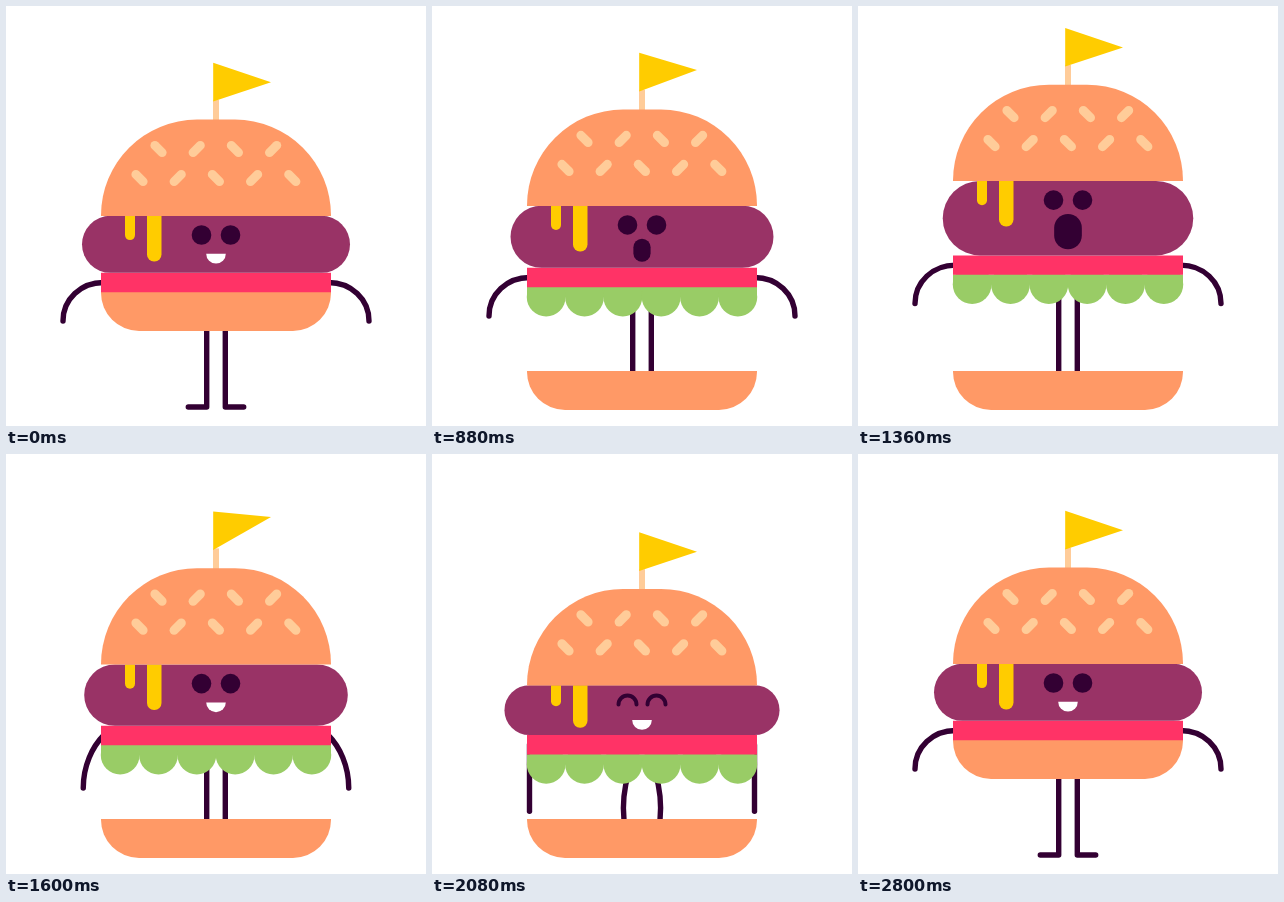
Animation of 420 by 420 pixels, one loop 2880 ms. Source, as an HTML page with a canvas:

```html
<!DOCTYPE html>
<html lang="en">
<head>
<meta charset="utf-8">
<title>Burger</title>
<style>
html, body { margin: 0; width: 100%; height: 100%; overflow: hidden; background: #fff; }
canvas { display: block; }
</style>
</head>
<body>
<canvas id="stage" width="420" height="420"></canvas>
<script>
const ctx = document.getElementById('stage').getContext('2d');
const LOOP = 2880, STEP = 80;
const BUN = '#ff9966', SEED = '#ffcc99', MEAT = '#993366', TOMATO = '#ff3366',
      LEAF = '#99cc66', MUSTARD = '#ffcc00', INK = '#330033';

const clamp = p => Math.max(0, Math.min(1, p));
const ramp = (t, from, to) => clamp((t - from) / (to - from));
const easeOut = (p, power) => 1 - (1 - p) ** power;
const smooth = p => p * p * (3 - 2 * p);
const wave = p => Math.sin(Math.PI * p);
const lerp = (a, b, p) => a + (b - a) * p;

// Offsets of the layers from the resting pose
function poseAt(t) {
  const fall = smooth(ramp(t, 1440, 1760));
  const rise = easeOut(ramp(t, 720, 1440), 1.25) * (1 - fall);
  const kick = ramp(t, 2320, 2400) * (1 - ramp(t, 2400, 2560));
  const drop = ramp(t, 240, 560) ** 2 - ramp(t, 2160, 2400) ** 2.5;
  return {
    top: -37.3 * rise + 38.5 * fall * (1 - ramp(t, 1840, 2380)) - 8 * kick,
    mid: -18.6 * rise + 28.6 * fall * (1 - ramp(t, 1840, 2320)) - 4 * kick,
    base: 79 * drop - 4 * kick,
    arm: 1 - fall + easeOut(ramp(t, 2320, 2800), 2),
    knee: 31 * ramp(t, 1600, 1760) * (1 - ramp(t, 1840, 2440)),
    tip: -3 * wave(ramp(t, 720, 1360)) - 14 * wave(ramp(t, 1440, 1800))
  };
}

function box(color, x, y, w, h, radii = 0) {
  ctx.fillStyle = color;
  ctx.beginPath();
  ctx.roundRect(x, y, w, h, radii);
  ctx.fill();
}

function disc(color, x, y, r, end = 2 * Math.PI) {
  ctx.fillStyle = color;
  ctx.beginPath();
  ctx.arc(x, y, r, 0, end);
  ctx.fill();
}

function stroke(color, width, path) {
  ctx.strokeStyle = color;
  ctx.lineWidth = width;
  ctx.beginPath();
  path();
  ctx.stroke();
}

// Draws once as is and once reflected about the vertical middle
function mirrored(draw) {
  draw();
  ctx.save();
  ctx.translate(420, 0);
  ctx.scale(-1, 1);
  draw();
  ctx.restore();
}

function limbs({ mid, arm, knee }) {
  const x = bent => lerp(97.5, bent, arm);
  const y = (straight, bent) => lerp(straight, bent, arm) + mid;
  mirrored(() => {
    stroke(INK, 5.4, () => {
      const hip = 293 + mid;
      ctx.moveTo(200.7, hip);
      ctx.quadraticCurveTo(200.7 - knee, (hip + 401) / 2, 200.7, 401);
      ctx.lineTo(182.3, 401);
    });
    stroke(INK, 5.4, () => {
      ctx.moveTo(97.5, 276.5 + mid);
      ctx.bezierCurveTo(x(75), y(299, 276.5), x(57), y(321, 293), x(57), y(343, 315));
    });
  });
}

function lettuce(mid, gap) {
  const open = clamp(gap / 30);
  if (!open) return;
  ctx.save();
  ctx.translate(95, 286 + mid);
  ctx.scale(1, open);
  box(LEAF, 0, 0, 230, 10);
  for (let i = 0; i < 6; i++) disc(LEAF, (i + 0.5) * 230 / 6, 10, 19.4);
  ctx.restore();
}

function face(t, y, lift) {
  const gasping = t >= 800 && t < 1600;
  const laughing = t >= 1680 && t < 2160;
  for (const x of [195.5, 224.5]) {
    if (laughing) stroke(INK, 4, () => ctx.arc(x, y + 22.5, 9, Math.PI, 0));
    else disc(INK, x, y + 19.2, 9.8);
  }
  if (gasping) {
    const w = 13 + 0.42 * lift, h = 18 + 0.5 * lift;
    box(INK, 210 - w / 2, y + 33, w, h, w / 2);
  } else disc('#fff', 210, y + 38, 9.8, Math.PI);
}

function seedRow(count, x, y) {
  for (let i = 0; i < count; i++) {
    const sx = x + 38.2 * i, slant = i % 2 ? -3.6 : 3.6;
    stroke(SEED, 9, () => {
      ctx.moveTo(sx - 3.6, y - slant);
      ctx.lineTo(sx + 3.6, y + slant);
    });
  }
}

function topBun(y, tip) {
  box(SEED, 207, y - 116, 6, 22);
  ctx.fillStyle = MUSTARD;
  ctx.beginPath();
  ctx.moveTo(207.2, y - 153);
  ctx.lineTo(265, y - 133.5 + tip);
  ctx.lineTo(207.2, y - 114.3);
  ctx.fill();
  box(BUN, 95, y - 96.2, 230, 96.4, [96, 96, 0, 0]);
  seedRow(4, 152.5, y - 66.8);
  seedRow(5, 133.5, y - 37.8);
}

function draw(t) {
  const pose = poseAt(t);
  const { top, mid, base, tip } = pose;
  const y = 209.8 + top, h = 57 + mid - top, w = 325 - h;
  const squash = Math.min(0, (h - 57) * 0.45);

  ctx.fillStyle = '#fff';
  ctx.fillRect(0, 0, 420, 420);
  ctx.lineCap = 'round';
  ctx.lineJoin = 'round';

  limbs(pose);
  lettuce(mid, base - mid);
  box(BUN, 95, 286 + base, 230, 39, [0, 0, 38, 38]);
  box(TOMATO, 95, 266.8 + mid, 230, 19.4);
  box(MEAT, 210 - w / 2, y, w, h, h / 2);
  box(MUSTARD, 119, y, 10, 24.3 + squash, [0, 0, 5, 5]);
  box(MUSTARD, 141, y, 14.5, 45.7 + squash, [0, 0, 7, 7]);
  face(t, y + squash, Math.max(0, -top));
  topBun(y, tip);
}

const start = performance.now();
function tick() {
  const t = (performance.now() - start) % LOOP;
  draw(Math.floor(t / STEP) * STEP);
  requestAnimationFrame(tick);
}
tick();
</script>
</body>
</html>
```
